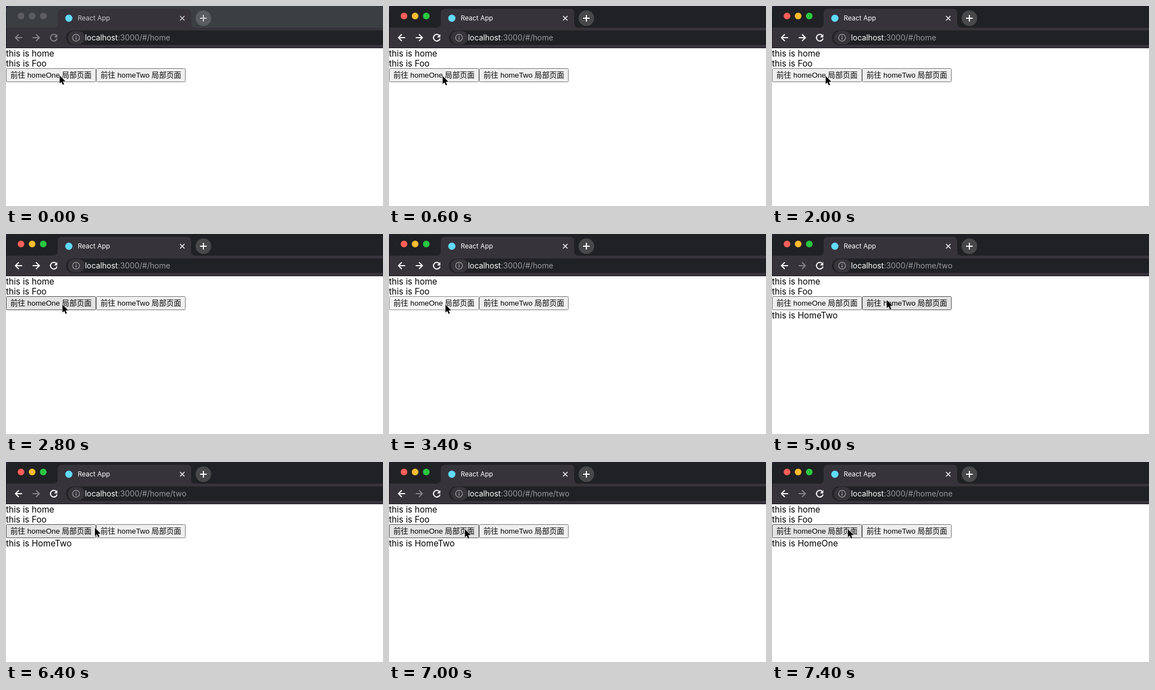
An HTML page that plays this animation: 678x360 px, repeating every 8000 ms.

```html
<!DOCTYPE html>
<html lang="zh-CN">
<head>
<meta charset="utf-8">
<title>Routing demo</title>
<style>
html, body { margin: 0; width: 100%; height: 100%; overflow: hidden; background: #fff; }
svg { display: block; font-family: Inter, sans-serif; }
.strip { fill: #202124; }
.bar { fill: #37333b; }
.plus { fill: #48484a; }
.ink { fill: #fff; }
.line { fill: none; stroke: #fff; stroke-width: 2; }
.thin { stroke-width: 1.5; }
.off { stroke: #85828a; }
.inactive .strip { fill: #3c3f42; }
.inactive .plus { fill: #5a5d60; }
.inactive .light { fill: #5d5c61; }
.inactive .ink { fill: #cbc9cd; }
.inactive .line { stroke: #85828a; }
.inactive .tabline { stroke: #d2d1d4; }
.page { font-size: 15.3px; }
.button { font: 13.333px "Liberation Sans", "Noto Sans CJK SC", "Noto Sans CJK", sans-serif; }
.button rect { fill: #efefef; stroke: #767676; }
.button.hover rect { fill: #e3e3e3; stroke: #4f4f4f; }
.button.press rect { fill: #f5f5f5; stroke: #8d8d8d; }
</style>
</head>
<body>
<svg width="678" height="360" viewBox="0 0 678 360">
  <g id="browser">
    <path fill="#29273a" d="M0 0h12v12H0z"/>
    <path class="strip" d="M0 75V9Q0 0 9 0H678V75z"/>
    <path class="bar" d="M0 39H85Q93 39 93 31V13Q93 5 101 5H325Q333 5 333 13V31Q333 39 341 39H678V75H0z"/>
    <path fill="#1b1a1e" d="M0 9h1v66H0zM0 75h678v1H0z"/>
    <circle class="light" cx="27" cy="18" r="6" fill="#ff5f57"/>
    <circle class="light" cx="47" cy="18" r="6" fill="#febc2e"/>
    <circle class="light" cx="67" cy="18" r="6" fill="#28c840"/>
    <circle cx="113" cy="22" r="6.5" fill="#61dafb"/>
    <text class="ink" x="129" y="26" font-size="11.9">React App</text>
    <path class="line thin tabline" d="M313 18l8 8m0-8l-8 8"/>
    <circle class="plus" cx="355" cy="22" r="14"/>
    <path class="line tabline" d="M349 22h12m-6-6v12"/>
    <path class="line" d="M29 57H17m6-6l-6 6 6 6"/>
    <path class="line" id="forward" d="M48 57h12m-6-6l6 6-6 6"/>
    <path class="line" d="M90.6 53.2A6 6 0 1 0 91.8 58.5"/>
    <path class="ink" id="reloadTip" d="M92.3 50.5v6h-6z"/>
    <path fill="#202124" d="M678 44H121a13 13 0 0 0 0 26H678z"/>
    <rect x="111" y="45" width="31" height="24" rx="12" fill="#37353a"/>
    <circle cx="126" cy="57" r="6.2" fill="none" stroke="#a3a1a7" stroke-width="1.3"/>
    <path fill="#a3a1a7" d="M125.3 53.4h1.5v1.5h-1.5zM125.3 56h1.5v4.6h-1.5z"/>
    <text x="142" y="62" font-size="13.85" fill="#9b9a9f"><tspan fill="#fff">localhost</tspan>:3000/#/home<tspan id="route"></tspan></text>
  </g>
  <g class="page">
    <text x="0" y="91">this is home</text>
    <text x="0" y="109">this is Foo</text>
    <text x="0" y="152" id="child"></text>
  </g>
  <g class="button">
    <rect x=".5" y="112.5" width="161" height="24" rx="2"/>
    <text x="8" y="129">前往 homeOne 局部页面</text>
  </g>
  <g class="button">
    <rect x="162.5" y="112.5" width="160" height="24" rx="2"/>
    <text x="170" y="129">前往 homeTwo 局部页面</text>
  </g>
  <path id="cursor" d="M0 0V14.6L3.3 11.5 5.6 16.8 8 15.8 5.7 10.6H10.4z" stroke="#fff" stroke-width="1.1" paint-order="stroke"/>
</svg>
<script>
const LOOP = 8000, FOCUS = 600;

// Pointer samples: time, x, y, state of the first button, state of the second
const pointer = [
  [0, 96.5, 125], [200, 96.5, 126],
  [2200, 150, 123, 'hover'], [2400, 296, 121], [2600, 190, 122], [2800, 101.5, 127, 'hover'],
  [3400, 101.5, 127, 'press'], [3600, 101.5, 127, 'hover'],
  [4000, 148, 122, 'hover'], [4200, 194.5, 119, '', 'hover'], [4400, 206.5, 119, '', 'hover'],
  [4800, 206.5, 119, '', 'press'], [5000, 206.5, 119, '', 'hover'],
  [6000, 200, 118, '', 'hover'], [6200, 181, 118, '', 'hover'], [6400, 160, 118.5, 'hover'],
  [6600, 146, 119, 'hover'], [6800, 139, 120, 'hover'], [7000, 136.5, 121, 'hover'],
  [7200, 136.5, 121, 'press'], [7400, 136.5, 121, 'hover']
];
const routes = [[0, ''], [3600, 'One'], [5000, 'Two'], [7400, 'One']];

const find = id => document.getElementById(id);
const [browser, forward, reloadTip, route, child, cursor] =
  ['browser', 'forward', 'reloadTip', 'route', 'child', 'cursor'].map(find);
const buttons = document.querySelectorAll('.button');
const latest = (steps, t) => steps.findLast(step => step[0] <= t);

function draw() {
  const t = performance.now() % LOOP;
  const [, x, y, ...states] = latest(pointer, t);
  const name = latest(routes, t)[1];
  const focused = t >= FOCUS;

  browser.setAttribute('class', focused ? '' : 'inactive');
  reloadTip.style.fill = focused ? '' : '#85828a';
  forward.classList.toggle('off', name !== '');
  route.textContent = name && '/' + name.toLowerCase();
  child.textContent = name && 'this is Home' + name;
  buttons.forEach((button, i) => button.setAttribute('class', 'button ' + (states[i] || '')));
  cursor.setAttribute('transform', `translate(${x} ${y})`);
  requestAnimationFrame(draw);
}
draw();
</script>
</body>
</html>
```
